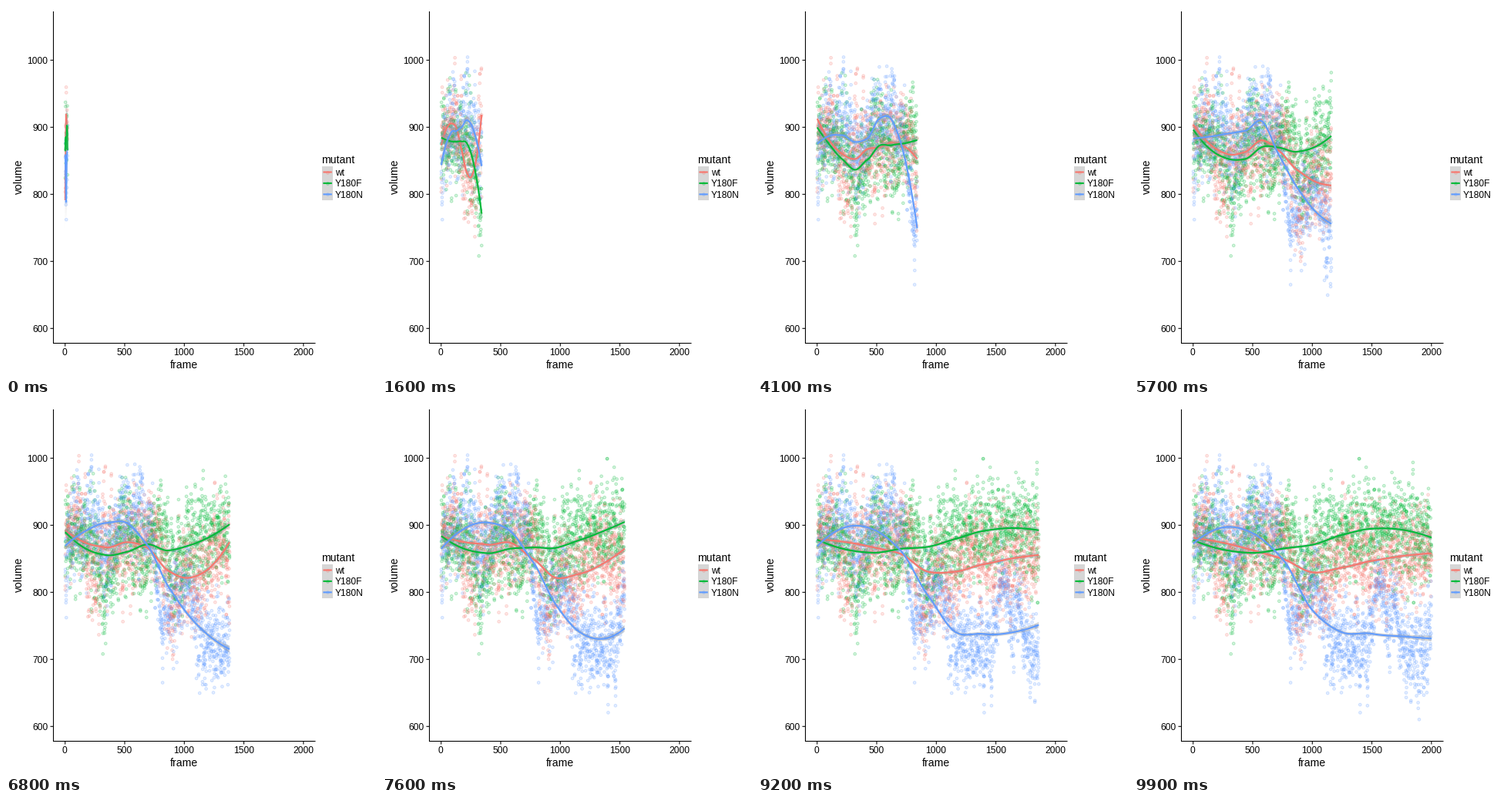
Write a matplotlib script that moves like this. It is 480x480 px and loops after 10000 ms.

```python
import numpy as np
import matplotlib.pyplot as plt
from matplotlib.animation import FuncAnimation
from matplotlib.colors import to_rgba
from matplotlib.patches import Polygon, Rectangle

FRAMES, STEP = 100, 20
KNOTS, SPAN = 9, 0.75
PT = 0.72  # points per pixel at 100 dpi

# name, colour, noise level, turning points (time, mean volume)
MUTANTS = [
    ("wt", "#F8766D", 37,
     [(0, 840), (20, 890), (120, 912), (235, 812), (340, 882), (450, 860),
      (720, 888), (800, 870), (900, 762), (980, 835), (1100, 812),
      (1280, 866), (1500, 842), (2000, 862)]),
    ("Y180F", "#00BA38", 36,
     [(0, 850), (20, 900), (70, 868), (150, 885), (240, 872), (325, 798),
      (500, 900), (645, 842), (790, 898), (940, 828), (1050, 882),
      (1400, 895), (1700, 898), (2000, 880)]),
    ("Y180N", "#619CFF", 34,
     [(0, 838), (20, 872), (100, 904), (160, 885), (225, 925), (345, 842),
      (470, 912), (640, 918), (740, 880), (800, 760), (1040, 812),
      (1140, 728), (1460, 714), (1560, 832), (1640, 740), (1680, 805),
      (1760, 712), (1940, 708), (2000, 755)]),
]

plt.rcParams["font.family"] = "Liberation Sans"
fig = plt.figure(figsize=(4.8, 4.8), dpi=100, facecolor="white")
ax = fig.add_axes([0, 0, 1, 1])
ax.axis("off")
ax.set_xlim(0, 480)
ax.set_ylim(480, 0)
ax.set_autoscale_on(False)


def px(t):
    return 76.7 + 0.1546 * np.asarray(t)


def py(v):
    return 70.3 + 0.87 * (1000 - np.asarray(v))


# ---- simulated volumes ----
rng = np.random.default_rng(18)
time = np.arange(1, FRAMES * STEP + 1)


def noise():
    """Short-range correlated noise without slow drift."""
    n = np.convolve(rng.standard_normal(len(time)), [0.45, 0.77, 0.45], "same")
    return np.clip(n - np.convolve(n, np.full(90, 1 / 90), "same"), -2.9, 2.9)


vol = np.column_stack([np.interp(time, *zip(*means)) + sd * noise()
                       for _, _, sd, means in MUTANTS])
points = np.column_stack([px(np.repeat(time, 3)), py(vol.ravel())])


# ---- smoothing curves ----
def loess(n):
    """Level and slope of a local quadratic fit at evenly spaced knots."""
    u = np.linspace(0, 1, n)
    level, slope = [], []
    for u0 in np.linspace(0, 1, KNOTS):
        d = np.abs(u - u0)
        h = np.sort(d)[int(SPAN * n) - 1] * 1.001
        w = np.clip(1 - (d / h) ** 3, 0, 1) ** 1.5
        _, b, a = np.polyfit(u - u0, vol[:n], 2, w=w)
        level.append(a)
        slope.append(b / (KNOTS - 1))
    return np.array(level), np.array(slope)


S = np.linspace(0, KNOTS - 1, 81)
SEG = np.minimum(S.astype(int), KNOTS - 2)
F = (S - SEG)[:, None]


def hermite(v, m):
    """Cubic curve through the knots."""
    a, b, ma, mb = v[SEG], v[SEG + 1], m[SEG], m[SEG + 1]
    return (a + F * ma + F**2 * (3 * (b - a) - 2 * ma - mb)
            + F**3 * (2 * (a - b) + ma + mb))


# ---- static parts ----
def line(xs, ys, color="black", w=1.07, z=9):
    return ax.plot(xs, ys, color=color, lw=w * PT, zorder=z, snap=False,
                   solid_capstyle="butt")[0]


def text(x, y, s, size=12, ha="center", rot=0):
    ax.text(x, y, s, fontsize=size * PT, ha=ha, va="baseline",
            rotation=rot, rotation_mode="anchor")


def dots(x, y, colors, z):
    d = ax.scatter(x, y, s=(3.7 * PT) ** 2, linewidths=0.9 * PT, zorder=z)
    d.set_facecolor([to_rgba(c, 0.17) for c in colors])
    d.set_edgecolor([to_rgba(c, 0.27) for c in colors])
    return d


line([61.5, 61.5], [7, 438])
line([61, 401.5], [437.5, 437.5])
for t in range(0, 2001, 500):
    line([px(t)] * 2, [437.5, 441.5])
    text(px(t) - 0.4, 453.3, str(t))
for v in range(600, 1001, 100):
    line([57.5, 61.5], [py(v)] * 2)
    text(54.5, py(v) + 4.3, str(v), ha="right")
text(231, 470, "frame", 14)
text(21, 221.5, "volume", 14, rot=90)
text(409.5, 204, "mutant", 14, ha="left")

colors = [m[1] for m in MUTANTS]
ax.add_patch(Rectangle((410, 208), 14, 44, color="#D6D6D6", lw=0))
for k, (name, color, *_) in enumerate(MUTANTS):
    y = 215.5 + 14.4 * k
    dots([417], [y], [color], 2)
    line([411.4, 422.8], [y, y], color, 2.1)
    text(426.6, y + 4.5, name, ha="left")

# ---- moving parts ----
cloud = dots([], [], colors, 1)
bands, curves = [], []
for k, c in enumerate(colors):
    band = Polygon(np.zeros((3, 2)), fc="#999999", alpha=0.4, lw=0, zorder=2 + k)
    bands.append(ax.add_patch(band))
    curves.append(line([], [], c, 2.1, 2.5 + k))


def update(i):
    n = STEP * (i + 1)
    cloud.set_offsets(points[:3 * n])
    x = px(np.linspace(time[0], time[n - 1], len(S)))
    ys = py(hermite(*loess(n)))
    edge = np.abs(S / (KNOTS - 1) * 2 - 1) ** 6
    half = 92 / np.sqrt(n) * (1 + 0.8 * edge)
    for band, curve, y in zip(bands, curves, ys.T):
        curve.set_data(x, y)
        band.set_xy(np.column_stack([np.r_[x, x[::-1]],
                                     np.r_[y - half, (y + half)[::-1]]]))
    return [cloud, *bands, *curves]


anim = FuncAnimation(fig, update, frames=FRAMES, interval=100,
                     repeat=True, repeat_delay=0, blit=False)
plt.show()
```
